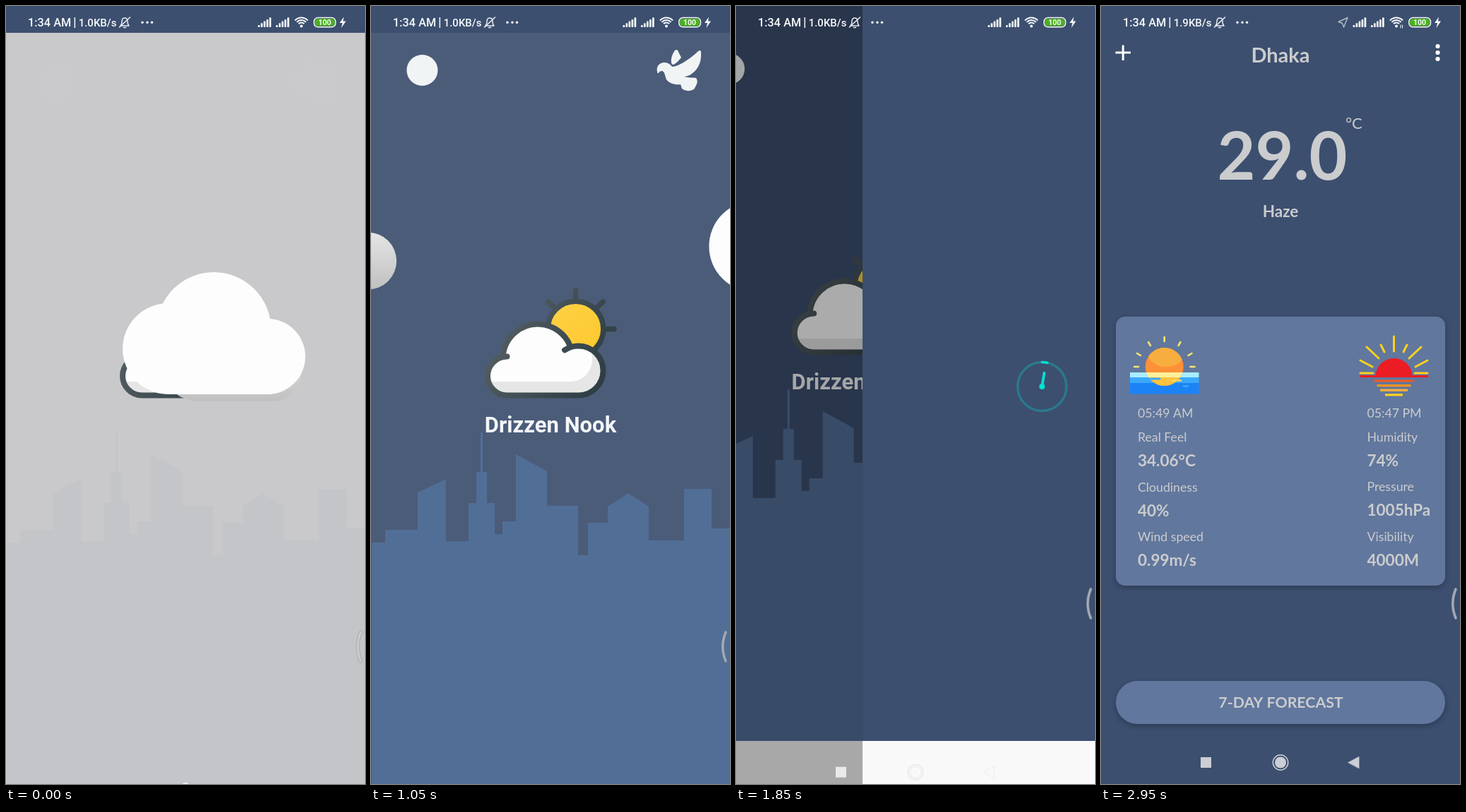
Recreate the animation shown at these times as an HTML page with a canvas. Size 508 px wide and 1102 px high, loop 3 s.

```html
<!DOCTYPE html>
<html lang="en">
<head>
<meta charset="utf-8">
<title>Weather app splash</title>
<style>
html, body { margin: 0; width: 100%; height: 100%; overflow: hidden; background: #3c4f6f; }
canvas { display: block; width: 508px; height: 1102px; }
</style>
</head>
<body>
<canvas id="stage" width="508" height="1102"></canvas>
<script>
const W = 508, H = 1102, LOOP = 3000;
const NAVY = [60, 79, 111], GREY = [202, 202, 204];
const SLIDE = 1698, NAV_IN = 1800, LOADER = 1775, PAGE = 2600;
const c = document.getElementById('stage').getContext('2d');

const clamp = v => Math.max(0, Math.min(1, v));
const ease = p => 0.5 - 0.5 * Math.cos(Math.PI * clamp(p));
const span = (t, a, b) => clamp((t - a) / (b - a));
const mix = (a, b, k) => `rgb(${a.map((v, i) => Math.round(v + (b[i] - v) * k))})`;

function layer(draw, alpha = 1, x = 0, y = 0) {
  c.save();
  c.globalAlpha *= alpha;
  c.translate(x, y);
  draw();
  c.restore();
}
function rect(x, y, w, h, color) {
  c.fillStyle = color;
  c.fillRect(x, y, w, h);
}
function disc(x, y, r, color) {
  c.fillStyle = color;
  c.beginPath();
  c.arc(x, y, r, 0, 7);
  c.fill();
}
function round(x, y, w, h, r, color) {
  c.fillStyle = color;
  c.beginPath();
  c.roundRect(x, y, w, h, r);
  c.fill();
}
function stroke(color, width, cap = 'round') {
  c.strokeStyle = color;
  c.lineWidth = width;
  c.lineCap = cap;
  c.lineJoin = 'round';
  c.stroke();
}
function line(x1, y1, x2, y2, color, width, cap) {
  c.beginPath();
  c.moveTo(x1, y1);
  c.lineTo(x2, y2);
  stroke(color, width, cap);
}
function ring(x, y, r, from, to, color, width, cap) {
  c.beginPath();
  c.arc(x, y, r, from, to);
  stroke(color, width, cap);
}
function text(s, x, y, font, color, align = 'left') {
  c.font = font;
  c.fillStyle = color;
  c.textAlign = align;
  c.fillText(s, x, y);
}

// Splash screen

const skyline = new Path2D('M1 1102V760H20V742H66V689L106 670V758H138V704H149V660H155V604H158V660H164V704H175V748H186V730H205V635L249 659V708H293V778H307V732H335V709L364 690L393 709V757H443V684H482V740H508V1102Z');
const dove = new Path2D('M405 93C403 85 409 80 415 80C420 80 424 83 426 86C436 86 455 72 463 64Q467 61 467 66C468 82 461 92 451 98Q446 100 443 100C449 102 456 101 460 102C464 107 460 113 457 118Q447 123 440 117L438 111C431 112 422 110 418 104C416 100 416 93 412 92Q408 92 407 95Q405 96 405 93ZM425 80C424 74 427 67 430 63Q432 61 434 63L439 73C436 77 431 82 428 83Q425 83 425 80Z');

function cloud(x, y, scale, fill) {
  c.save();
  c.translate(x, y);
  c.scale(scale, scale);
  c.beginPath();
  for (const [cx, cy, r] of [[64.5, 108.5, 64.5], [129, 81, 81], [205, 119.5, 53.5]]) {
    c.moveTo(cx + r, cy);
    c.arc(cx, cy, r, 0, Math.PI * 2);
  }
  c.rect(64.5, 100, 140.5, 73);
  c.fillStyle = fill;
  c.fill();
  c.restore();
}

function logo() {
  const edge = c.createLinearGradient(175, 440, 335, 530);
  edge.addColorStop(0, '#566064');
  edge.addColorStop(1, '#2c3c43');
  const rays = [[289.5, 403, 289.5, 416], [251, 419, 260, 428], [328, 419, 319, 428], [344, 457.5, 331, 457.5]];
  for (const r of rays) line(...r, edge, 7.5);
  const sun = c.createLinearGradient(260, 430, 320, 485);
  sun.addColorStop(0, '#ffd044');
  sun.addColorStop(1, '#fcc92e');
  disc(289.5, 457.5, 39.5, sun);
  ring(289.5, 457.5, 39.3, 0, 7, edge, 7.5);

  const body = new Path2D();
  body.arc(192.5, 524, 27.5, Math.PI / 2, -Math.PI / 2);
  body.arc(236, 500, 49.4, Math.PI + 0.12, -0.4);
  body.arc(293.5, 516.5, 35, -1.75, Math.PI / 2);
  body.closePath();
  c.save();
  c.clip(body);
  rect(150, 440, 190, 120, '#e6e6e6');
  round(120, 430, 193, 102, [0, 0, 31, 0], '#fdfdfd');
  c.restore();

  c.beginPath();
  c.arc(192.5, 524, 27.5, -Math.PI / 2, Math.PI / 2, true);
  c.arc(293.5, 516.5, 35, Math.PI / 2, -2.16, true);
  stroke(edge, 8);
  ring(236, 500, 49.4, Math.PI + 0.06, -0.38, edge, 8);
}

function splash(t) {
  const f = ease((t + 90) / 1440);
  const lift = t >= NAV_IN ? -61 : 0;
  const show = Math.min(1, f * 1.5);
  const birdY = 19.6 * (1 - f) - 2;

  rect(0, 0, W, H, mix(GREY, NAVY, f));
  rect(0, 0, W, 38, mix(NAVY, NAVY, 0));
  layer(() => {
    c.fillStyle = 'rgb(83,113,154)';
    c.fill(skyline);
  }, 0.04 + 0.96 * f, 0, lift);
  layer(() => {
    disc(72.5, 91, 22, '#f1f4f5');
    c.fillStyle = '#f1f4f5';
    c.fill(dove);
  }, show, 0, birdY);
  layer(() => {
    text('Drizzen Nook', 254, 604, 'bold 31px Roboto, sans-serif', '#f3f6f8', 'center');
  }, show, 0, lift);
  layer(logo, 1, 0, lift);

  const shade = c.createLinearGradient(0, 0, 0, 173);
  shade.addColorStop(0, '#fcfcfc');
  shade.addColorStop(1, '#c0c0c0');
  cloud(94 - 430 * (f - 0.309), 376 - 178.6 * (f - 0.309), 0.755, shade);
  cloud(161.6 + 353 * f, 378.6 - 163.4 * f, 1, '#fdfdfd');
  if (t < 50) disc(254, 1106, 6, '#f4f4f4');
}

// Loading dial

function loader(t) {
  const TEAL = '#00e0d4', top = -Math.PI / 2, deg = Math.PI / 180;
  const u = Math.max(0, (t - LOADER) / 740);
  const needle = 360 * ease(u % 1);
  const reach = 360 * ease(u);
  const from = 360 * ease((u - 0.68) / 0.9);
  const to = u > 0 ? reach * 0.96 + 4 : 0;
  const a = top + needle * deg;
  ring(254, 539, 34.5, 0, 7, 'rgba(0,224,212,.29)', 3.4);
  if (to > from) ring(254, 539, 34.5, top + from * deg, top + to * deg, TEAL, 3.4);
  line(254, 539, 254 + 19.5 * Math.cos(a), 539 + 19.5 * Math.sin(a), TEAL, 3.8);
  disc(254, 539, 4, TEAL);
}

// Forecast page

function sunrise() {
  const ray = '#ffe573';
  for (const r of [[67, 476, 70, 481], [51, 492, 56, 495], [47, 511, 53, 511]]) {
    line(...r, ray, 2.6);
    line(179.5 - r[0], r[1], 179.5 - r[2], r[3], ray, 2.6);
  }
  line(89.7, 469, 89.7, 475, ray, 2.6);
  rect(41, 519, 97.5, 7, '#a9ecff');
  rect(41, 526, 97.5, 8, '#3aa9fb');
  rect(41, 534, 97.5, 15.5, '#1c83f7');
  c.save();
  c.beginPath();
  c.arc(89.7, 511, 27, 0, 7);
  c.clip();
  rect(60, 480, 60, 60, '#fc9138');
  c.fillStyle = '#f8ae3e';
  c.beginPath();
  c.ellipse(92, 493, 25, 18, 0, 0, 7);
  c.fill();
  rect(60, 519, 60, 7, '#ffef9a');
  rect(60, 526, 60, 14, '#ffc33f');
  c.restore();
  line(70, 528, 83, 528, '#3aa9fb', 3);
  line(100, 530.5, 113, 530.5, '#ffd65a', 2.5);
  line(117, 538.5, 123, 538.5, '#3aa9fb', 2.5);
}

function sunset() {
  const ray = '#fcd21c', red = '#ec1c24';
  for (const r of [[396, 480, 401, 490], [376, 483, 393, 499], [367, 502, 384, 511], [367, 520, 385, 520]]) {
    line(...r, ray, 3);
    line(829 - r[0], r[1], 829 - r[2], r[3], ray, 3);
  }
  line(414.5, 468, 414.5, 489, ray, 3);
  c.fillStyle = red;
  c.beginPath();
  c.arc(414.5, 525, 26, Math.PI, 0);
  c.fill();
  line(366, 524.5, 463, 524.5, red, 3, 'butt');
  [[28, '#f05a24'], [24, '#f7931e'], [19.5, '#fbb03b'], [12.5, '#fcd21c']].forEach(([half, color], i) =>
    line(414.5 - half, 531 + 6.6 * i, 414.5 + half, 531 + 6.6 * i, color, 3.2, 'butt'));
}

function column(x, y, rows) {
  rows.forEach((s, i) => {
    const value = i > 0 && i % 2 === 0;
    const dy = i === 0 ? 0 : value ? 69 + 70.5 * (i / 2 - 1) : 34 + 70.5 * (i - 1) / 2;
    const font = value ? 'bold 22.5px Lato, sans-serif' : '17.7px Lato, sans-serif';
    text(s, x, y + dy, font, '#cbccce');
  });
}

function page(t) {
  const ink = '#cbccce', panel = '#61779d';
  c.save();
  c.shadowColor = 'rgba(20,30,50,.4)';
  c.shadowBlur = 7;
  c.shadowOffsetY = 3;
  round(21, 440, 466, 381, 13, panel);
  round(21, 956, 466, 61, 30.5, panel);
  c.restore();
  line(20.5, 66, 42, 66, '#fff', 3, 'butt');
  line(31.2, 55.5, 31.2, 77, '#fff', 3, 'butt');
  for (const y of [57, 66, 75]) disc(476.5, y, 3.1, '#fff');
  layer(() => {
    text('Dhaka', 254, 80, 'bold 29px Lato, sans-serif', ink, 'center');
    text('29.0', 256.5, 246, 'bold 93px Lato, sans-serif', ink, 'center');
    text('°C', 346, 174, '22px Lato, sans-serif', ink);
    text('Haze', 254, 299, 'bold 22.5px Lato, sans-serif', ink, 'center');
    text('7-DAY FORECAST', 254.5, 994, 'bold 21.3px Lato, sans-serif', ink, 'center');
    sunrise();
    sunset();
    column(52, 583, ['05:49 AM', 'Real Feel', '34.06°C', 'Cloudiness', '40%', 'Wind speed', '0.99m/s']);
    column(376.5, 582.5, ['05:47 PM', 'Humidity', '74%', 'Pressure', '1005hPa', 'Visibility', '4000M']);
  }, 0.4 + 0.6 * span(t, PAGE, PAGE + 200));
}

// System bars

function navIcons(t) {
  const k = span(t, 1900, 2200);
  const color = mix([233, 233, 233], [203, 206, 212], k);
  layer(() => {
    rect(141, 1064, 15, 15, color);
    ring(254, 1071.5, 10.7, 0, 7, color, 1.5);
    if (k > 0) layer(() => disc(254, 1071.5, 8, color), k);
    else ring(254, 1071.5, 8, 0, 7, color, 1);
    c.beginPath();
    c.moveTo(350, 1071.5);
    c.lineTo(365, 1063.5);
    c.lineTo(365, 1079.5);
    c.closePath();
    if (k > 0) {
      c.fillStyle = color;
      layer(() => c.fill(), k);
    }
    stroke(color, 0.8);
  }, 1, 0, 28 * (1 - span(t, NAV_IN, 1900)));
}

function bell() {
  c.beginPath();
  c.moveTo(162, 28);
  c.lineTo(174, 28);
  c.quadraticCurveTo(172, 26, 172, 22);
  c.quadraticCurveTo(172, 17, 168, 17);
  c.quadraticCurveTo(164, 17, 164, 22);
  c.quadraticCurveTo(164, 26, 162, 28);
  stroke('#e9edf3', 1.5);
  line(166.5, 30.5, 169.5, 30.5, '#e9edf3', 1.5);
  line(160.5, 30, 175.5, 16, '#e9edf3', 1.6);
}

function statusBar(t) {
  const white = '#f6f8fa', late = t >= PAGE;
  text('1:34 AM', 31, 29, '500 16.3px Roboto, sans-serif', white);
  rect(96.6, 16, 1.5, 15, white);
  text(late ? '1.9KB/s' : '1.0KB/s', 156.5, 29, '500 15px Roboto, sans-serif', white, 'right');
  bell();
  const dim = t >= 2300 && t < 2500;
  [193, 200, 206.5].forEach((x, i) => disc(x, 23.3, 1.7, dim && i === 2 ? '#75839b' : white));

  if (t >= 2300) {
    c.beginPath();
    c.moveTo(349, 16.5);
    c.lineTo(343.5, 30);
    c.lineTo(341.5, 24.5);
    c.lineTo(336, 22.5);
    c.closePath();
    stroke('#b4bdca', 1.4);
  }
  for (const x of [356.5, 382]) {
    for (let i = 0; i < 5; i++) {
      const h = 3 + 2.7 * i;
      round(x + 4 * i, 30 - h, 2.7, h, 0.8, white);
    }
  }
  disc(418, 28.5, 2, white);
  for (const r of [5.5, 9, 12.5]) ring(418, 29, r, -Math.PI * 0.76, -Math.PI * 0.24, white, 2, 'butt');
  if (late) {
    line(424, 27, 424, 31, white, 1);
    line(426.5, 27, 426.5, 31, white, 1);
  }
  round(437, 18, 28, 10.5, 4, '#4caf22');
  c.beginPath();
  c.roundRect(435.8, 16.6, 30.6, 13.2, 5.5);
  stroke(white, 1.5);
  text('100', 451, 27.2, 'bold 10.5px Roboto, sans-serif', white, 'center');
  c.fillStyle = white;
  c.fill(new Path2D('M478 15.5L472 24H476L474.5 31L481 21.5H477Z'));
}

function edgeHandle(t) {
  layer(() => {
    c.beginPath();
    c.moveTo(502, 887);
    c.quadraticCurveTo(493.5, 907.5, 502, 928);
    stroke('rgba(110,112,120,.35)', 5);
    stroke(mix([203, 203, 205], [163, 169, 182], span(t, 0, 1000)), 3.4);
  }, 1, 0, t >= SLIDE ? -61 : 0);
}

function draw(t) {
  const p = ease((t - SLIDE) / 257);
  const edge = W * (1 - p);
  const bar = t >= NAV_IN;
  if (p < 1) {
    layer(() => splash(t), 1, -W * p / 4, 0);
    if (bar) rect(0, 1041, W, 61, '#f9f9f9');
    if (p > 0) rect(0, 0, W, H, `rgba(0,0,0,${p / 2})`);
  }
  if (p > 0) {
    layer(() => {
      rect(0, 0, W, H, mix(NAVY, NAVY, 0));
      if (t < PAGE) loader(t);
      else page(t);
      if (bar) rect(0, 1041, W, 61, mix([249, 249, 249], NAVY, span(t, 1900, 2200)));
    }, 1, edge, 0);
  }
  if (bar) navIcons(t);
  edgeHandle(t);
  statusBar(t);
}

const start = performance.now();
function tick() {
  draw((performance.now() - start) % LOOP);
  requestAnimationFrame(tick);
}
tick();
</script>
</body>
</html>
```
